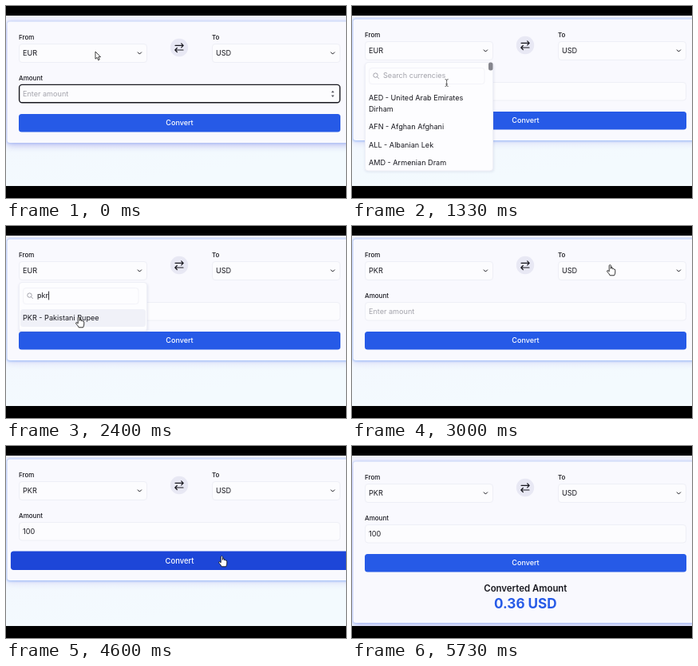
Recreate the animation shown at these times as an HTML page. Size 426 px wide and 240 px high, loop 5.79 s.

```html
<!DOCTYPE html>
<html lang="en">
<head>
<meta charset="utf-8">
<title>Currency converter</title>
<style>
  html, body { margin: 0; width: 100%; height: 100%; overflow: hidden; background: #000; }
  svg { display: block; width: 100vw; height: 100vh; }
  text { font-family: Inter, "Open Sans", sans-serif; white-space: pre; }
</style>
</head>
<body>
<svg viewBox="0 0 426 240">
  <defs>
    <linearGradient id="page" x2="0.3" y2="1">
      <stop offset="0" stop-color="#f3f4fd"/><stop offset="1" stop-color="#f3fafe"/>
    </linearGradient>
    <filter id="soft" x="-10%" y="-20%" width="120%" height="140%"><feGaussianBlur stdDeviation="5"/></filter>
    <filter id="tight" x="-10%" y="-20%" width="120%" height="140%"><feGaussianBlur stdDeviation="1.6"/></filter>
    <clipPath id="screen"><rect y="12" width="426" height="213"/></clipPath>
  </defs>
  <rect width="426" height="240" fill="#000"/>
  <g clip-path="url(#screen)">
    <rect y="12" width="426" height="213" fill="url(#page)"/>
    <g id="card"></g>
    <g id="cursor"></g>
  </g>
</svg>
<script>
const LOOP = 5790;
const BLUE = [38, 90, 231], DARK_BLUE = [29, 70, 216];
const INK = '#18181f', GREY = '#a3a3ab', LINE = '#eeeff6', FIELD = '#fcfcfe';

const CURRENCIES = [
  ['AED - United Arab Emirates', 'Dirham'], ['AFN - Afghan Afghani'],
  ['ALL - Albanian Lek'], ['AMD - Armenian Dram'], ['PKR - Pakistani Rupee']
];

// time, x, y of the pointer's hot spot
const PATH = [
  [0, 112, 57], [150, 112, 57], [600, 165, 61], [900, 165, 61], [1400, 116, 98],
  [2150, 116, 98], [2350, 92, 114], [2560, 92, 114], [2960, 324, 49], [3060, 324, 49],
  [3400, 272, 108], [4150, 272, 108], [4450, 271, 138], [4950, 271, 138], [5400, 290, 236]
];
const SHAPES = [
  [0, 'arrow'], [450, 'hand'], [1050, 'beam'], [2250, 'hand'], [2650, 'arrow'],
  [2800, 'hand'], [3200, 'beam'], [4330, 'hand'], [5070, 'arrow'], [5400, 'none']
];
const SEARCH = [[0, ''], [1900, 'p'], [2040, 'pk'], [2180, 'pkr']];
const AMOUNT = [[0, ''], [3720, '1'], [3900, '10'], [4050, '100']];

const clamp = v => Math.max(0, Math.min(1, v));
const ramp = (t, from, to) => clamp((t - from) / (to - from));
const ease = v => v * v * (3 - 2 * v);
const mix = (a, b, p) => a + (b - a) * p;
const during = (t, from, to) => t >= from && t < to;
const latest = (steps, t) => steps.filter(s => s[0] <= t).pop()[1];

const text = (s, x, y, { size = 9.1, fill = INK, weight = 400, anchor = 'start' } = {}) =>
  `<text x="${x}" y="${y}" font-size="${size}" fill="${fill}" font-weight="${weight}" text-anchor="${anchor}">${s}</text>`;
const box = (x, y, w, h, fill, extra = '') =>
  `<rect x="${x}" y="${y}" width="${w}" height="${h}" rx="3.5" fill="${fill}" ${extra}/>`;
const line = (d, width = 1.2, color = INK) =>
  `<path d="${d}" fill="none" stroke="${color}" stroke-width="${width}" stroke-linecap="round" stroke-linejoin="round"/>`;
const label = (s, x, y) => text(s, x, y, { size: 8, weight: 500 });
const measure = document.createElement('canvas').getContext('2d');
function caretAfter(s, x, y) {
  measure.font = '9.1px Inter, "Open Sans", sans-serif';
  return line(`M${x + measure.measureText(s).width + 0.7} ${y - 5}v10`, 0.9);
}

function select(value, x) {
  return box(x + .5, 47.5, 160, 23, FIELD, `stroke="${LINE}"`) + text(value, x + 5, 62.3)
    + line(`M${x + 149.2} 57.9l2.2 2.2 2.2-2.2`, 1);
}

function swapButton() {
  return '<circle cx="217" cy="52" r="11.2" fill="#e8e8f4"/>'
    + line('M212 49.3h10M219.7 46.8l2.5 2.5-2.5 2.5M222 55h-10M214.3 52.5l-2.5 2.5 2.5 2.5', 1.2);
}

function amountField(t) {
  const value = latest(AMOUNT, t);
  const active = t < 650 || during(t, 3470, 4530);
  let out = active
    ? box(16.6, 98.4, 401.8, 22.4, FIELD, `stroke="${INK}" stroke-width="1.4"`)
    : box(16.5, 98.5, 402, 22.5, FIELD, `stroke="${LINE}"`);
  out += value ? text(value, 21, 113.3) : text('Enter amount', 21, 113.3, { fill: GREY });
  if (active) out += '<path d="M407.5 108.3l1.9-2.6 1.9 2.6zM407.5 111.5l1.9 2.6 1.9-2.6z" fill="#55555e"/>';
  if (during(t, 3470, 4530)) out += caretAfter(value, 21, 110);
  return out;
}

function convertButton(t) {
  const p = ease(ramp(t, 4330, 4500)) - ease(ramp(t, 5070, 5230));
  const fill = `rgb(${BLUE.map((c, i) => Math.round(mix(c, DARK_BLUE[i], p)))})`;
  return `<g transform="translate(217.5 146.2) scale(${1 + .05 * p})">`
    + box(-201.5, -11.2, 403, 22.4, fill)
    + text('Convert', 0, 3.2, { fill: '#fff', anchor: 'middle', weight: 500, size: 9 }) + '</g>';
}

function dropdown(t) {
  const shown = ramp(t, 700, 820) - ramp(t, 2540, 2660);
  if (shown <= 0) return '';
  const query = latest(SEARCH, t);
  const rows = query ? CURRENCIES.filter(c => c[0].toLowerCase().includes(query)) : CURRENCIES.slice(0, 4);
  const height = query ? 61 : 135.5;
  let out = box(16.5, 73.5, 160, height, '#fdfdff', `stroke="${LINE}"`)
    + box(21.5, 80.5, 144.5, 20, 'none', `stroke="#f3f3f8"`)
    + '<circle cx="29.5" cy="89.6" r="2.7" fill="none" stroke="#9a9aa3" stroke-width=".9"/>'
    + line('M31.5 91.6l2 2', .9, '#9a9aa3')
    + (query ? text(query, 39, 93.3) : text('Search currencies', 39, 93.3, { fill: GREY }));
  if (during(t, 1450, 2540)) out += caretAfter(query, 38.9, 90);
  if (query) out += box(18, 107, 157, 22, '#f0f1f8');
  let y = 121.3;
  for (const lines of rows) {
    lines.forEach((s, i) => out += text(s, 21, y + i * 13.4));
    y += 22.4 + (lines.length - 1) * 13.7;
  }
  if (!query) out += '<rect x="171" y="73.5" width="5.5" height="10" rx="2.5" fill="#85858d"/>';
  return `<g opacity="${shown}" transform="translate(0 ${12 * (1 - shown)})">`
    + box(16, 75, 162, height, '#7078a8', 'opacity=".15" filter="url(#tight)"') + out + '</g>';
}

function drawCard(t) {
  const hover = ease(ramp(t, 30, 260)) - ease(ramp(t, 5290, 5500));
  const done = t >= 4930;
  const height = done ? 202 : 152;
  let out = box(1, 22, 432, height, '#6a66dc', `opacity="${mix(.42, .2, hover)}" filter="url(#soft)"`)
    + box(1, 19, 432, height + 1, '#78a4f6', `opacity="${mix(.4, .7, hover)}" filter="url(#tight)"`)
    + box(1.5, 19.5, 432, height - .5, '#f9f9fe')
    + label('From', 16, 42) + label('To', 258, 42)
    + select(t < 2540 ? 'EUR' : 'PKR', 16) + select('USD', 258) + swapButton()
    + label('Amount', 16, 93) + amountField(t) + convertButton(t);
  if (done) {
    out += text('Converted Amount', 217.3, 182.3, { size: 11.4, weight: 600, anchor: 'middle' })
      + text('0.36 USD', 217.3, 203, { size: 17.1, weight: 700, anchor: 'middle', fill: `rgb(${BLUE})` });
  }
  return `<g transform="translate(0 ${-3 * hover})">${out}${dropdown(t)}</g>`;
}

const POINTERS = {
  none: '',
  arrow: '<path d="M0 0v9.2l2.1-1.9 1.5 3.4 1.6-.7-1.5-3.3h2.8z" fill="#fff" stroke="#111" stroke-width=".8" stroke-linejoin="round"/>',
  hand: '<path transform="translate(-.7 -.6) scale(1.08)" d="M-1 .8Q0-.6 1 .8V4.6Q2-.0 2.9 4.9 4 3.7 4.7 5.4 6 4.8 6 6.5V8.8Q6 10.5 4.9 12.4H-.1Q-1.2 10.2-3.1 8.2-4 6.6-2.5 6.6L-1 7.8z" fill="#fff" stroke="#111" stroke-width=".8" stroke-linejoin="round"/>',
  beam: line('M-1.7-4.4Q0-4.4 0-3.2 0-4.4 1.7-4.4M0-3.2V3.2M-1.7 4.4Q0 4.4 0 3.2 0 4.4 1.7 4.4M-1 1.7h2', .8, '#444')
};

function drawCursor(t) {
  const next = PATH.findIndex(p => p[0] > t);
  const b = PATH[next < 0 ? PATH.length - 1 : next];
  const a = next < 0 ? b : PATH[next - 1];
  const p = a === b ? 0 : ease(ramp(t, a[0], b[0]));
  return `<g transform="translate(${mix(a[1], b[1], p)} ${mix(a[2], b[2], p)})">${POINTERS[latest(SHAPES, t)]}</g>`;
}

const card = document.getElementById('card');
const cursor = document.getElementById('cursor');
const start = performance.now();
let lastStep = -1;

// The picture advances fifteen times a second.
function update() {
  const step = Math.floor(((performance.now() - start) % LOOP + 3.4) * 15 / 1000);
  if (step !== lastStep) {
    lastStep = step;
    const t = Math.round(Math.min(step, 86) * 20 / 3) * 10;
    card.innerHTML = drawCard(t);
    cursor.innerHTML = drawCursor(t);
  }
  requestAnimationFrame(update);
}
update();
</script>
</body>
</html>
```
